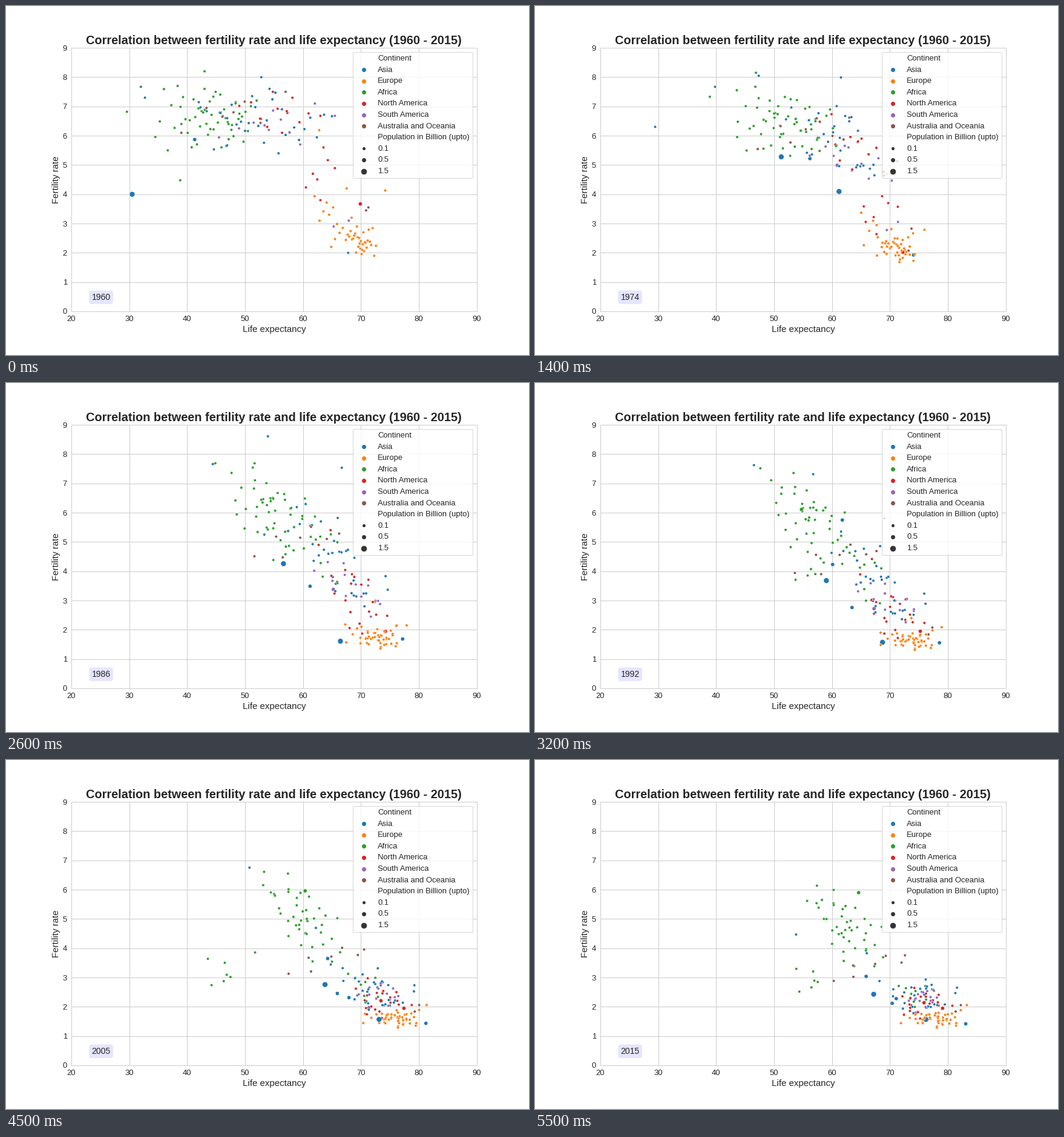
A matplotlib script that plays this animation: 864x576 px, repeating every 5600 ms.

```python
import numpy as np
import matplotlib.pyplot as plt
from matplotlib.animation import FuncAnimation

plt.rcParams.update({
    "font.family": "Liberation Sans",
    "text.color": ".15", "axes.labelcolor": ".15",
    "xtick.color": ".15", "ytick.color": ".15",
    "axes.edgecolor": ".8", "axes.linewidth": 1,
    "grid.color": ".8", "grid.linewidth": 1,
    "axes.axisbelow": True,
})

FIRST, YEARS = 1960, 56
SMALL, MEDIUM, LARGE = 20, 40, 80      # marker areas by population class
ASIA, EUROPE, AFRICA = "Asia", "Europe", "Africa"
NORTH, SOUTH, OCEANIA = "North America", "South America", "Australia and Oceania"
COLORS = dict(zip(
    (ASIA, EUROPE, AFRICA, NORTH, SOUTH, OCEANIA),
    ("#1f77b4", "#ff7f0e", "#2ca02c", "#d62728", "#9467bd", "#8c564b")))

T = np.arange(YEARS)
U = T / T[-1]
rng = np.random.default_rng(5)
dots = []                              # (colour, life, fertility, area) over time


def transition(mid, width):
    """S-curve from 0 to 1 with its steepest point in year mid."""
    s = np.tanh((T - mid) / (2 * width))
    return (s - s[0]) / (s[-1] - s[0])


def bump(year, width):
    return np.exp(-((T - year) / width) ** 2)


def country(place, life, fert, mid, width=7, power=0.7, sizes=None, dip=None):
    """Life expectancy rises by a power law, fertility falls along an S-curve.

    dip is (year, width, loss of life expectancy, loss of fertility)."""
    x = life[0] + (life[1] - life[0]) * U ** power
    y = fert[0] + (fert[1] - fert[0]) * transition(mid, width)
    if dip:
        hit = bump(*dip[:2])
        x, y = x - dip[2] * hit, y - dip[3] * hit
    area = np.full(YEARS, SMALL)
    for start, value in (sizes or {}).items():
        area[start:] = value
    dots.append((COLORS[place], x, np.maximum(y, 1.2), area))


def scores(n):
    """Scores from -1 to 1, denser in the middle, in random order."""
    s = rng.permutation(np.linspace(-1, 1, n))
    return 0.6 * s + 0.4 * s ** 3


def crowd(place, n, life, fert, spread, mid, lead=0, tilt=0, **shape):
    """Countries around a common path; the healthier ones change earlier.

    spread holds the half ranges of life and fertility at start and end."""
    l0, l1, f0, f1 = spread
    for u, v, w in zip(scores(n), scores(n), scores(n)):
        country(place,
                (life[0] + l0 * u, life[1] + l1 * (0.8 * u + 0.3 * w)),
                (fert[0] + f0 * v, fert[1] + f1 * (0.6 * v + 0.5 * w) - tilt * u),
                mid - lead * u + 4 * w, **shape)


crowd(AFRICA, 37, (42.5, 62.5), (6.6, 4.75), (8, 8, 1.1, 1), 37, 8, 0.8)
crowd(AFRICA, 9, (47, 74.5), (6.9, 2.45), (4, 3.5, 0.7, 0.5), 27, 4)
crowd(AFRICA, 7, (48, 62), (6.4, 3), (4, 6, 0.8, 0.8), 29, 0,
      power=0.5, dip=(45, 10, 14, 0))
crowd(EUROPE, 31, (70, 78.8), (2.4, 1.58), (2.6, 4, 0.5, 0.33), 18, width=5, power=1.2)
crowd(EUROPE, 13, (65.2, 75), (3.2, 1.6), (3.2, 3.5, 1, 0.28), 15, 3,
      width=5, power=0.9)
crowd(ASIA, 30, (53.5, 75.5), (6.5, 2.3), (11.5, 6.5, 1.1, 0.7), 25, 10)
crowd(NORTH, 12, (56, 75.3), (6.8, 2.25), (7, 4, 0.7, 0.5), 21, 6)
crowd(NORTH, 7, (63, 76), (4.7, 1.9), (2.5, 5, 0.9, 0.35), 13, 2)
crowd(SOUTH, 10, (55.5, 76), (6.4, 2.35), (10, 3.5, 0.7, 0.4), 19, 6, width=8)
crowd(SOUTH, 2, (66.6, 76.6), (3, 2.1), (1.3, 0.4, 0.1, 0.1), 30)
crowd(OCEANIA, 7, (48, 67), (6.8, 3.4), (9, 7, 0.7, 0.6), 25, 3, width=9)
crowd(OCEANIA, 2, (71.1, 81.8), (3.5, 1.95), (0.2, 0.4, 0.05, 0.1), 10,
      width=4, power=1.1)

# Large countries
country(ASIA, (50, 76.2), (6.6, 1.57), 14, 2.5, 0.62, {0: LARGE}, (0, 2, 19.5, 2.6))
country(ASIA, (41.3, 67.2), (5.87, 2.43), 27, 10, 0.7, {0: MEDIUM, 7: LARGE})
country(ASIA, (46.9, 71.1), (5.67, 2.28), 23, 5, 0.7, {4: MEDIUM})
country(ASIA, (67.8, 83.1), (2, 1.42), 25, 6, 0.65, {7: MEDIUM})
country(ASIA, (46.9, 65.9), (6.6, 3.04), 38, 5, 0.45, {27: MEDIUM})
country(ASIA, (45.8, 70.4), (6.8, 2.12), 31, 6, 1, {29: MEDIUM})
country(NORTH, (69.9, 79.1), (3.67, 1.95), 6, 2.5, 1, {0: MEDIUM})
country(NORTH, (57.3, 75.9), (6.78, 2.14), 21, 6, 0.7, {42: MEDIUM})
country(SOUTH, (54.1, 74.4), (6.2, 1.78), 20, 9, 0.8, {12: MEDIUM})
country(AFRICA, (39, 64.6), (6.4, 5.9), 30, 10, 0.9, {32: MEDIUM})

# Unusual paths
country(ASIA, (32, 53.8), (7.67, 4.47), 50, 4, 0.75)
country(ASIA, (32.7, 66), (7.29, 3.83), 40, 6, 0.6, dip=(23, 10, 0, -1.8))
country(ASIA, (52.8, 77.2), (8, 2.75), 33, 3, 0.75)
country(ASIA, (42.3, 68.2), (6.97, 2.88), 30, 12, dip=(17.5, 6, 32, 0))
country(AFRICA, (43, 65.9), (8.2, 3.97), 36, 5, 1.3, dip=(34, 1.2, 48, 0))
country(AFRICA, (29.6, 57.4), (6.7, 6.04), 40, 8, 0.8, dip=(27, 18, 0, -1.1))
country(AFRICA, (38.8, 64), (4.38, 4), 30, 8, 0.5, dip=(18, 11, 0, -1.4))
country(EUROPE, (62.8, 77.9), (6.19, 1.78), 17, 8, 0.6)
country(EUROPE, (74.2, 83.3), (4.13, 2.06), 10, 5, 1.2)

dots = [dots[i] for i in rng.permutation(len(dots))]
tint = [d[0] for d in dots]
life, fert, area = (np.array([d[k] for d in dots]) for k in (1, 2, 3))

fig = plt.figure(figsize=(12, 8), dpi=72, facecolor="white")
ax = fig.add_axes([0.125, 0.125, 0.775, 0.755])
ax.set(xlim=(20, 90), ylim=(0, 9))
ax.set_yticks(range(10))
ax.grid(True)
ax.tick_params(labelsize=13, bottom=False, left=False)
ax.set_xlabel("Life expectancy", fontsize=15)
ax.set_ylabel("Fertility rate", fontsize=15)
ax.set_title("Correlation between fertility rate and life expectancy (1960 - 2015)",
             fontsize=20, fontweight="bold")


def entry(label, color="none", s=36, edge=1):
    return ax.scatter([], [], s=s, color=color, linewidth=edge, label=label)


handles = [entry("Continent")]
handles += [entry(name, color) for name, color in COLORS.items()]
handles.append(entry("Population in Billion (upto)"))
handles += [entry(text, ".2", s, 0.6) for text, s in
            (("0.1", SMALL), ("0.5", MEDIUM), ("1.5", LARGE))]
ax.legend(handles=handles, loc="upper right", fontsize=13, scatterpoints=1,
          framealpha=0.8, edgecolor=".8")

points = ax.scatter(life[:, 0], fert[:, 0], s=area[:, 0], c=tint,
                    edgecolors="white", linewidths=0.5)
year = ax.text(23.5, 0.4, str(FIRST), fontsize=14,
               bbox=dict(boxstyle="round", facecolor="#e5e5ff", edgecolor="none"))


def update(i):
    points.set_offsets(np.column_stack([life[:, i], fert[:, i]]))
    points.set_sizes(area[:, i])
    year.set_text(str(FIRST + i))
    return points, year


anim = FuncAnimation(fig, update, frames=YEARS, interval=100,
                     repeat=True, repeat_delay=0)
plt.show()
```
